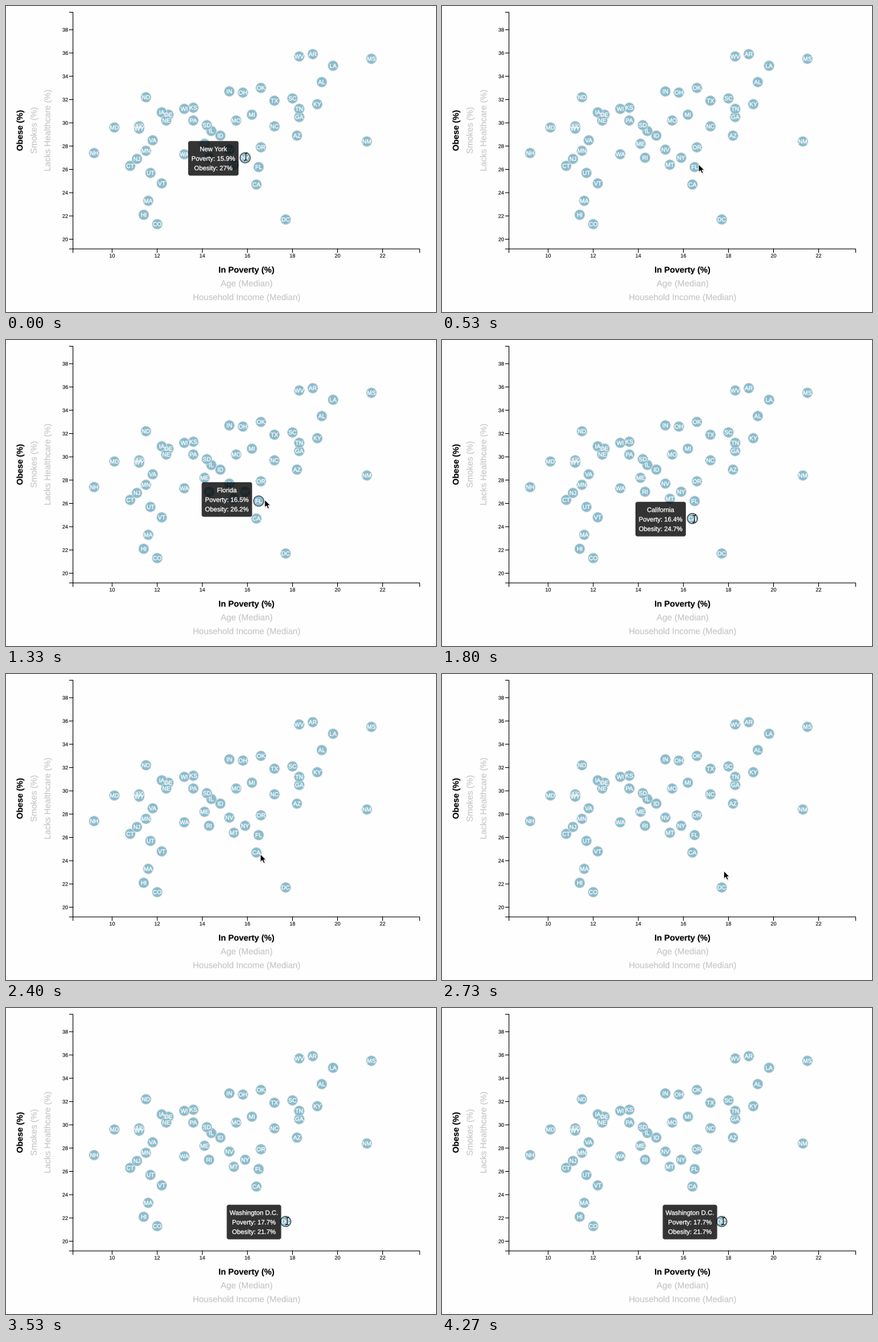
Recreate the animation shown at these times as a matplotlib script. Size 640 px wide and 456 px high, loop 4340 ms.

```python
import matplotlib.pyplot as plt
from matplotlib.animation import FuncAnimation
from matplotlib.patches import Circle, FancyBboxPatch, Polygon
from matplotlib.patheffects import Stroke

W, H, DPI = 640, 456, 64
PT = 72 / DPI  # points per pixel
FRAMES, STEP = 62, 70
INK, MUTED, DOT, RING = "black", "#c6c6c6", "#8abccd", "#e3e3e3"
LEFT, RIGHT, TOP, BOTTOM = 99.7, 615.7, 9.3, 362.0

# abbreviation: (poverty %, obesity %)
STATES = {
    "AL": (19.3, 33.5), "AK": (11.2, 29.7), "AZ": (18.2, 28.9), "AR": (18.9, 35.9),
    "CA": (16.4, 24.7), "CO": (12.0, 21.3), "CT": (10.8, 26.3), "DE": (12.5, 30.7),
    "DC": (17.7, 21.7), "FL": (16.5, 26.2), "GA": (18.3, 30.5), "HI": (11.4, 22.1),
    "ID": (14.8, 28.9), "IL": (14.4, 29.3), "IN": (15.2, 32.7), "IA": (12.2, 30.9),
    "KS": (13.6, 31.3), "KY": (19.1, 31.6), "LA": (19.8, 34.9), "ME": (14.1, 28.2),
    "MD": (10.1, 29.6), "MA": (11.6, 23.3), "MI": (16.2, 30.7), "MN": (11.5, 27.6),
    "MS": (21.5, 35.5), "MO": (15.5, 30.2), "MT": (15.4, 26.4), "NE": (12.4, 30.2),
    "NV": (15.2, 27.7), "NH": (9.2, 27.4), "NJ": (11.1, 26.9), "NM": (21.3, 28.4),
    "NY": (15.9, 27.0), "NC": (17.2, 29.7), "ND": (11.5, 32.2), "OH": (15.8, 32.6),
    "OK": (16.6, 33.0), "OR": (16.6, 27.9), "PA": (13.6, 30.2), "RI": (14.3, 27.0),
    "SC": (18.0, 32.1), "SD": (14.2, 29.8), "TN": (18.3, 31.2), "TX": (17.2, 31.9),
    "UT": (11.7, 25.7), "VT": (12.2, 24.8), "VA": (11.8, 28.5), "WA": (13.2, 27.3),
    "WV": (18.3, 35.7), "WI": (13.2, 31.2), "WY": (11.2, 29.5),
}

# (start ms, end ms, state, full name, box width)
HOVERS = [
    (0, 340, "NY", "New York", 75),
    (610, 1480, "FL", "Florida", 75),
    (1610, 2360, "CA", "California", 75),
    (2930, 4340, "DC", "Washington D.C.", 81),
]
TEXT_CURSOR = [(0, 270), (1670, 2360), (3000, 4340)]
# pointer path: (ms, x, y)
PATH = [
    (0, 357, 224.5), (210, 357, 224.5), (490, 382, 236), (1330, 385, 238),
    (1440, 385, 239), (1740, 375.5, 266.5), (2310, 375.5, 266.5),
    (2730, 419.5, 293.5), (3010, 418.5, 317.5), (4340, 418.5, 317.5),
]
ARROW = [(0, 0), (0, 11.6), (2.7, 9.1), (4.7, 13.4), (6.7, 12.5), (4.9, 8.4), (8.4, 8.4)]


def px(poverty):
    return 158 + 33.55 * (poverty - 10)


def py(obesity):
    return 347.6 - 17.35 * (obesity - 20)


fig = plt.figure(figsize=(W / DPI, H / DPI), dpi=DPI, facecolor="#fefefe")
ax = fig.add_axes([0, 0, 1, 1])
ax.set(xlim=(0, W), ylim=(H, 0))
ax.axis("off")


def label(x, y, text, size, color=INK, heavier=0.15, **kw):
    """Text on a baseline at (x, y), size in pixels, slightly thickened."""
    kw = {"ha": "center", "va": "baseline", "family": "Liberation Sans", **kw}
    # drawn as outlines without snapping, so thin letters keep their place
    outline = Stroke(linewidth=heavier, foreground=color, snap=False)
    return ax.text(x, y, text, fontsize=size * PT, color=color,
                   path_effects=[outline], **kw)


def line(xs, ys, color=INK, width=1.0, **kw):
    return ax.plot(xs, ys, color=color, lw=width * PT, snap=False, **kw)[0]


def draw_axes():
    tick = 5.3
    line([LEFT - tick, LEFT, LEFT, LEFT - tick], [TOP, TOP, BOTTOM, BOTTOM],
         solid_joinstyle="miter")
    line([LEFT, LEFT, RIGHT, RIGHT], [BOTTOM + tick, BOTTOM, BOTTOM, BOTTOM + tick],
         solid_joinstyle="miter")
    for value in range(20, 39, 2):
        y = py(value)
        line([LEFT - tick, LEFT], [y, y])
        label(92.5, y + 2.8, str(value), 7.7, heavier=0.1, ha="right")
    for value in range(10, 23, 2):
        x = px(value)
        line([x, x], [BOTTOM, BOTTOM + tick])
        label(x, 374.8, str(value), 7.7, heavier=0.1)

    upright = {"rotation": 90, "rotation_mode": "anchor"}
    label(358, 397.3, "In Poverty (%)", 12.5, weight="bold")
    label(358, 417.7, "Age (Median)", 12.9, MUTED)
    label(358, 438.2, "Household Income (Median)", 12.75, MUTED)
    label(24.7, 185.5, "Obese (%)", 12.5, weight="bold", **upright)
    label(45.6, 185.5, "Smokes (%)", 12.8, MUTED, **upright)
    label(65.9, 185.5, "Lacks Healthcare (%)", 12.75, MUTED, **upright)


def draw_dots():
    dots = {}
    for name, (poverty, obesity) in STATES.items():
        dots[name] = ax.add_patch(Circle((px(poverty), py(obesity)), 7.7, fc=DOT,
                                         ec=RING, lw=0.8 * PT, zorder=3))
    for name, (poverty, obesity) in STATES.items():
        label(px(poverty), py(obesity) + 3, name, 8.7, "white", 0.35, zorder=4)
    return dots


draw_axes()
dots = draw_dots()

tip_box = ax.add_patch(FancyBboxPatch((0, 0), 75, 51.5, fc="black", ec="none", alpha=0.8,
                                      boxstyle="round,pad=0,rounding_size=3", zorder=6))
tip_lines = [label(0, 0, "", 9.6, "white", 0.3, zorder=7) for _ in range(3)]

shadow = ax.add_patch(Polygon(ARROW, fc="black", ec="none", alpha=0.15, zorder=8))
arrow = ax.add_patch(Polygon(ARROW, fc="black", ec="white", lw=0.8 * PT, zorder=9))
beam_halo = line([], [], "white", 1.8, alpha=0.6, zorder=8)
beam = line([], [], INK, 1.0, zorder=9)


def pointer(t):
    for (t0, x0, y0), (t1, x1, y1) in zip(PATH, PATH[1:]):
        if t <= t1:
            u = (t - t0) / (t1 - t0)
            u = u * u * (3 - 2 * u)
            return x0 + (x1 - x0) * u, y0 + (y1 - y0) * u
    return PATH[-1][1:]


def place_cursor(t, over_text):
    x, y = pointer(t)
    arrow.set_xy([(x + dx, y + dy) for dx, dy in ARROW])
    shadow.set_xy([(x + dx + 0.6, y + dy + 1.6) for dx, dy in ARROW])
    for part in (beam_halo, beam):
        part.set_data([x - 2, x, x + 2, x, x, x - 2, x, x + 2],
                      [y - 5.6, y - 4.8, y - 5.6, y - 4.8, y + 4.8, y + 5.6, y + 4.8, y + 5.6])
        part.set_visible(over_text)
    arrow.set_visible(not over_text)
    shadow.set_visible(not over_text)


def place_tip(hover, over_text):
    tip_box.set_visible(hover is not None)
    for text in tip_lines:
        text.set_visible(hover is not None)
    if hover is None:
        return
    _, _, name, title, width = hover
    poverty, obesity = STATES[name]
    center = px(poverty) - 47.3
    # the tip hangs from the letters or from the taller dot
    top = py(obesity) - (24.9 if over_text else 28.1)
    tip_box.set_bounds(center - width / 2, top, width, 51.5)
    rows = (title, f"Poverty: {poverty:g}%", f"Obesity: {obesity:g}%")
    for i, (text, row) in enumerate(zip(tip_lines, rows)):
        text.set_text(row)
        text.set_position((center, top + 15.1 + 14.2 * i))


def update(frame):
    t = frame * STEP
    over_text = any(start <= t < end for start, end in TEXT_CURSOR)
    hover = next((h for h in HOVERS if h[0] <= t < h[1]), None)
    for name, dot in dots.items():
        active = hover is not None and hover[2] == name
        dot.set_edgecolor("#323232" if active else RING)
        dot.set_linewidth((1.0 if active else 0.8) * PT)
    place_tip(hover, over_text)
    place_cursor(t, over_text)
    return []


anim = FuncAnimation(fig, update, frames=FRAMES, interval=STEP, repeat=True,
                     repeat_delay=0, init_func=lambda: update(0))
plt.show()
```
